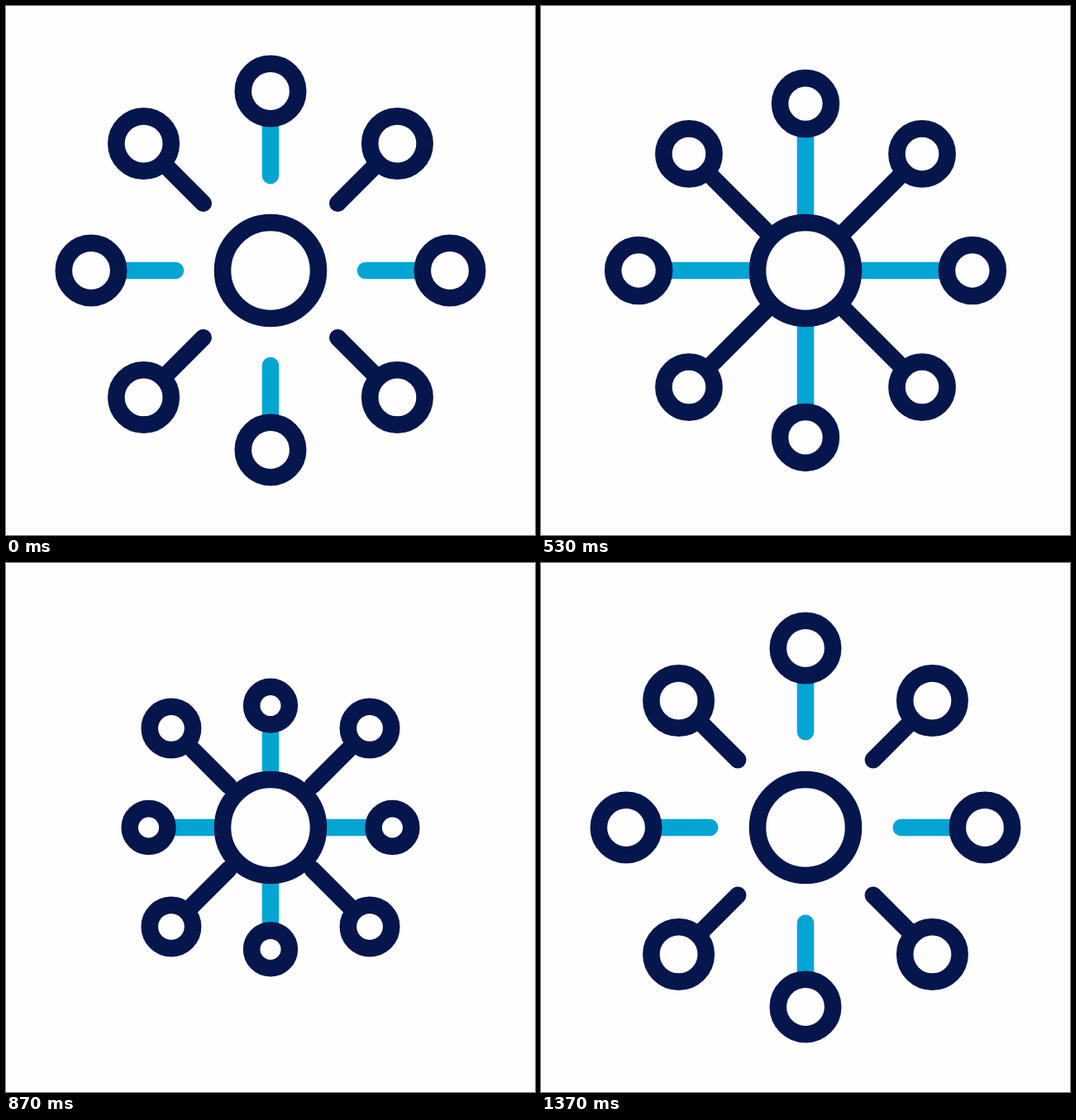
Write an HTML page with a canvas that moves like this. It is 640x640 px and loops after 1670 ms.

```html
<!DOCTYPE html>
<html lang="en">
<head>
<meta charset="utf-8">
<title>Hub and nodes</title>
<style>
  html, body { margin: 0; height: 100%; overflow: hidden; background: #fefefe; }
  canvas { display: block; }
</style>
</head>
<body>
<canvas id="stage" width="640" height="640"></canvas>
<script>
const ctx = document.getElementById('stage').getContext('2d');
const NAVY = '#05164d', BLUE = '#00a5d3';
const LOOP = 1670, LAST_STEP = 49;
const REST = 217;      // node distance from the hub centre
const LINE_REST = 115.8; // inner end of a detached line

// Times are in steps of 1/30 s.
const straight = {
  color: BLUE, depth: 73, lineMin: 64, inEnd: 25, outEnd: 41,
  easeIn: bezier(.167, .833), easeOut: bezier(.1, .68)
};
const diagonal = {
  color: NAVY, depth: 58, lineMin: 61, inEnd: 22, outEnd: 36.5,
  easeIn: bezier(.167, .833), easeOut: smooth
};

function smooth(x) { return x * x * (3 - 2 * x); }

// Cubic timing curve with handles (x1, 0) and (x2, 1).
function bezier(x1, x2) {
  return x => {
    let lo = 0, hi = 1;
    for (let i = 0; i < 24; i++) {
      const s = (lo + hi) / 2, q = 1 - s;
      if (3 * s * q * q * x1 + 3 * s * s * q * x2 + s * s * s < x) lo = s;
      else hi = s;
    }
    return smooth(lo);
  };
}

function progress(step, from, to) {
  return Math.min(1, Math.max(0, (step - from) / (to - from)));
}

function ring(x, radius) {
  ctx.strokeStyle = NAVY;
  ctx.beginPath();
  ctx.arc(x, 0, radius, 0, 2 * Math.PI);
  ctx.stroke();
}

function arm(kind, step) {
  const back = kind.easeOut(progress(step, kind.inEnd, kind.outEnd));
  const pull = kind.easeIn(progress(step, 13, kind.inEnd)) - back;
  const grow = smooth(progress(step, -1, 13)) - back;
  const distance = REST - kind.depth * pull;
  const radius = 33.2 - .149 * (REST - distance);
  const lineStart = LINE_REST - (LINE_REST - kind.lineMin) * (step < LAST_STEP ? grow : 0);

  ctx.strokeStyle = kind.color;
  ctx.beginPath();
  ctx.moveTo(lineStart, 0);
  ctx.lineTo(distance - radius, 0);
  ctx.stroke();
  ring(distance, radius);
}

function draw(now) {
  const step = Math.min(LAST_STEP, Math.floor((now % LOOP) * .03 + .1));
  ctx.setTransform(1, 0, 0, 1, 0, 0);
  ctx.fillStyle = '#fefefe';
  ctx.fillRect(0, 0, 640, 640);
  ctx.translate(320, 320);
  ctx.lineWidth = 20.6;
  ctx.lineCap = 'round';
  for (let i = 0; i < 8; i++) {
    arm(i % 2 ? diagonal : straight, step);
    ctx.rotate(Math.PI / 4);
  }
  ring(0, 58);
  requestAnimationFrame(() => draw(performance.now()));
}

draw(performance.now());
</script>
</body>
</html>
```
